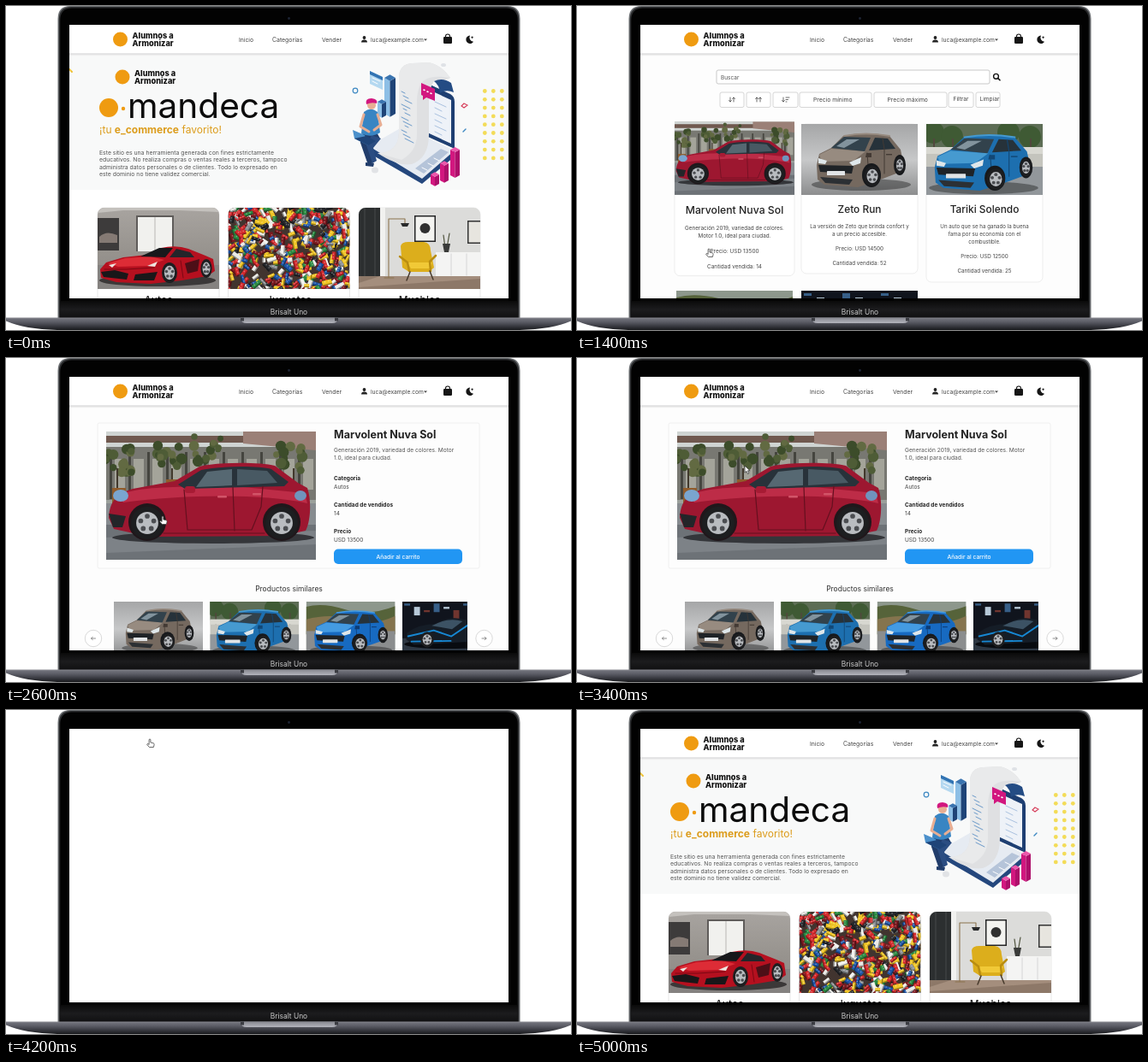
An HTML page that plays this animation: 660 by 379 pixels, repeating every 5.5 s.

```html
<!DOCTYPE html>
<html lang="es">
<head>
<meta charset="utf-8">
<title>Tienda</title>
<style>
html, body { margin: 0; width: 100%; height: 100%; overflow: hidden; background: #fff; }
#stage { display: block; width: 660px; height: 379px; }
text { font-family: Inter, "Open Sans", sans-serif; }
</style>
</head>
<body>
<svg id="stage" viewBox="0 0 660 379" xmlns="http://www.w3.org/2000/svg"></svg>
<script>
const LOOP = 5500, STEP = 100;
const BRAND = ['Alumnos a', 'Armonizar'];
const CARS = ['Marvolent Nuva Sol', 'Zeto Run', 'Tariki Solendo'];

// Drawing helpers
const rect = (x, y, w, h, fill, rx = 0, more = '') =>
  `<rect x="${x}" y="${y}" width="${w}" height="${h}" rx="${rx}" fill="${fill}" ${more}/>`;
const circ = (x, y, r, fill, more = '') => `<circle cx="${x}" cy="${y}" r="${r}" fill="${fill}" ${more}/>`;
const oval = (x, y, rx, ry, fill, more = '') =>
  `<ellipse cx="${x}" cy="${y}" rx="${rx}" ry="${ry}" fill="${fill}" ${more}/>`;
const path = (d, fill, more = '') => `<path d="${d}" fill="${fill}" ${more}/>`;
const line = (d, color, w = 1) => path(d, 'none', `stroke="${color}" stroke-width="${w}" stroke-linecap="round" stroke-linejoin="round"`);
const text = (x, y, size, s, fill = '#333', weight = 400, anchor = 'start') =>
  `<text x="${x}" y="${y}" font-size="${size}" fill="${fill}" font-weight="${weight}" text-anchor="${anchor}">${s}</text>`;
const mid = (x, y, size, s, fill, weight) => text(x, y, size, s, fill, weight, 'middle');
const box = (x, y, w, h, rx, color = '#ddd', fill = '#fff') => rect(x, y, w, h, fill, rx, `stroke="${color}" stroke-width=".8"`);
const photo = (x, y, w, h, vw, vh, art) =>
  `<svg x="${x}" y="${y}" width="${w}" height="${h}" viewBox="0 0 ${vw} ${vh}" preserveAspectRatio="xMinYMin slice">${art}</svg>`;
const group = (art, more = '') => `<g ${more}>${art}</g>`;
const grad = (id, ...stops) => `<linearGradient id="${id}" x2="0" y2="1">` +
  stops.map((c, i) => `<stop offset="${i / (stops.length - 1)}" stop-color="${c}"/>`).join('') + '</linearGradient>';

function random(seed) {
  return () => (seed = (seed * 16807) % 2147483647) / 2147483647;
}

function wheel(x, y, r, squash = 1) {
  let s = oval(x, y, r * squash, r, '#1d1e20') + oval(x, y, r * .68 * squash, r * .68, '#b9bcc0');
  for (let i = 0; i < 5; i++) {
    const a = i * 1.257 - 1.57;
    s += circ(x + Math.cos(a) * r * .42 * squash, y + Math.sin(a) * r * .42, r * .15, '#4b4d51');
  }
  return s;
}

// Photos as flat shapes
function street() {
  const rnd = random(41);
  let s = rect(0, 0, 245, 150, '#9ba19c') + rect(0, 0, 245, 26, '#cfd4d2') +
    rect(0, 18, 245, 62, '#787872') + rect(0, 5, 245, 8, '#70594f') + path('M160 0H245V22L160 14Z', '#9b8077');
  for (let x = 4; x < 245; x += 22) s += rect(x, 24, 3, 55, '#45453f') + rect(x + 6, 32, 12, 36, '#a4a49a');
  for (const [x, y] of [[14, 35], [75, 25], [118, 21], [214, 30]])
    for (let i = 0; i < 16; i++)
      s += circ(x + rnd() * 32 - 16, y + rnd() * 32 - 16, 3 + rnd() * 4, ['#3c4c2a', '#4e5c36', '#626a42'][i % 3]);
  for (const x of [12, 76, 117, 218]) s += rect(x, 43, 2, 30, '#41392d');
  s += rect(7, 66, 16, 25, '#8f5c2c') + rect(70, 56, 13, 20, '#8f5c2c') +
    rect(0, 84, 245, 66, '#878c90') + rect(0, 109, 245, 41, '#6d7277') + path('M0 124L245 116V132L0 142Z', '#7d8287') +
    oval(125, 124, 118, 7, '#34363a') +
    path('M3 101C4 83 11 73 31 67L80 58L109 41C125 36 178 35 197 40L224 60L235 66C240 80 239 105 233 116L205 122L50 123L9 114Z', '#9d1730') +
    path('M14 74C45 64 80 64 160 65L232 72L235 84C180 72 90 74 20 83Z', '#bd2c47') +
    path('M84 62L111 45C133 40 180 40 193 44L213 59L208 64L92 67Z', '#28323a') +
    path('M118 47L147 44V63L105 65Z', '#566872') + path('M153 44L188 46L200 60L153 63Z', '#485963') +
    line('M91 68L95 115H170L181 88L183 64M148 65L150 116M67 119H185', '#65101f', 1.2) +
    rect(92, 64, 12, 8, '#a71b34', 3) + rect(130, 75, 11, 2.5, '#d25468', 1) + rect(171, 72, 10, 2.5, '#d25468', 1) +
    oval(17, 75, 9, 7, '#7aa5cf') + oval(227, 75, 7, 6, '#7094bd') + path('M3 96L23 99L19 112L8 112Z', '#232529');
  return s + circ(48, 106, 22, '#20171b') + circ(205, 106, 22, '#20171b') + wheel(48, 107, 19) + wheel(205, 107, 19);
}

function hatch(paint, light, dark) {
  return oval(70, 71, 58, 7, '#000', 'opacity=".35"') +
    path('M18 48L21 35L35 28L49 14Q75 8 103 14L116 30L120 49L116 56L90 66L66 74L27 71L19 65Z', paint) +
    path('M21 36L35 29L75 32L61 43L24 44Z', light) +
    path('M35 28L50 15L81 16L74 32Z', '#32424c') + path('M41 26L53 18L68 18L50 28Z', '#82939d') +
    path('M79 31L86 16L101 17L110 29Z', '#26323a') + line('M95 17L97 30L97 58M77 34L78 48', dark, 1) +
    line('M50 14Q75 9 103 14', light, 2) +
    path('M20 48L61 49L59 58L22 56Z', '#1f2327') + path('M22 62L60 65L56 71L28 69Z', '#2c3034') +
    rect(30, 55, 21, 5, '#e1e4e6', .5) +
    path('M20 40L30 43L28 47L20 46Z', '#dfe7ea') + path('M56 45L70 39L69 46L60 49Z', '#dfe7ea') +
    path('M76 34l6 0v5l-7 0z', dark) + rect(99, 35, 7, 1.4, dark) +
    oval(82, 60, 11, 14, '#17191c') + oval(115, 48, 7, 12, '#17191c') + wheel(83, 61, 12, .8) + wheel(115, 48, 10, .6);
}

const studio = () => rect(0, 0, 136, 84, 'url(#studio)') + hatch('#75695f', '#978b80', '#433a34');
const plaza = () => rect(0, 0, 136, 84, '#c4c4bd') + rect(0, 0, 136, 28, '#5d6d55') +
  [8, 30, 96, 121].map((x, i) => circ(x, 10 + i % 2 * 5, 13, '#3f5a34') + rect(x, 17, 2, 18, '#51483d')).join('') +
  rect(0, 27, 136, 8, '#d8d8d1') + rect(0, 50, 136, 34, '#92979b') +
  group(hatch('#1d6faf', '#469ad0', '#124775'), 'transform="translate(-10 1) scale(1.1 1.04)"');
const road = () => rect(0, 0, 136, 84, '#8d978c') + path('M0 8Q25 1 60 12T136 7V50H0Z', '#56633a') +
  path('M0 27Q40 17 70 28T136 22V50H0Z', '#85744e') + rect(0, 45, 136, 39, '#8b8d8e') +
  group(hatch('#176ac1', '#449be2', '#0d3c75'), 'transform="translate(-7 3) scale(1.08 1)"');
function show() {
  let s = rect(0, 0, 136, 84, '#10141d');
  for (let i = 0; i < 9; i++) s += rect(3 + i * 15, 3 + i % 3 * 5, 9, 3 + i % 2 * 10, ['#375f88', '#b7c9d8', '#70352f'][i % 3]);
  return s + rect(0, 56, 136, 28, '#2d3743') + oval(68, 65, 65, 7, '#080b10') +
    path('M7 48Q25 34 52 34Q73 19 101 29L126 45L128 60L18 66L6 58Z', '#151d27') +
    path('M45 37Q70 23 92 30L76 42Z', '#3c5264') + line('M9 53L48 44L75 53L100 36L121 46M14 61L74 60', '#1688d4', 2.5) +
    wheel(38, 58, 12, .85) + wheel(110, 56, 12, .8);
}

function garage() {
  return rect(0, 0, 142, 96, 'url(#wall)') + path('M0 0H142V5L95 3H30L0 6Z', '#c4c1bd') +
    rect(45, 9, 44, 42, '#5f5c5a') + rect(47, 11, 40, 40, '#f1f1ee') + rect(66.5, 11, 1, 40, '#b9b8b4') +
    rect(0, 12, 25, 38, '#3d3b3b') + path('M2 34Q10 26 23 32V41H2Z', '#857a74') +
    rect(0, 67, 142, 29, '#858280') + oval(70, 85, 68, 7, '#3b3838') +
    path('M3 72L10 64L30 58L58 55L74 47Q92 43 106 48L126 56L135 60L137 74L128 80L98 85L62 89L22 87L4 82Z', '#b5101f') +
    path('M12 65L32 59L62 57L78 61L58 68L24 69Z', '#dd2c36') + path('M50 57L72 47L88 47L79 58Z', '#17181b') +
    path('M84 58L92 48L108 52L113 58Z', '#23252a') +
    path('M4 75L20 73L36 77L34 84L7 81Z', '#191719') + path('M44 78L70 75L66 85L42 85Z', '#191719') +
    path('M102 65L119 60L117 74L105 77Z', '#4d0f17') + line('M97 62L100 82M8 72L34 72L66 70', '#7c0713', 1) +
    path('M13 67l9-2l-5 5z', '#efe5df') + path('M58 68l12-5l-3 6z', '#efe5df') + wheel(84, 76, 12, .75) + wheel(127, 71, 11, .6);
}

function bricks() {
  const rnd = random(97);
  const tones = ['#d42a2d', '#f0c525', '#1e55a8', '#f1f1ed', '#e9e9e5', '#2b8a42', '#26282c', '#d42a2d', '#8a8f93', '#f0c525', '#7c1a20'];
  let s = rect(0, 0, 142, 96, '#41342f');
  for (let i = 0; i < 620; i++) {
    const x = rnd() * 150 - 4, y = rnd() * 104 - 4, w = 5 + rnd() * 7, h = 3.5 + rnd() * 2.5;
    const c = tones[Math.floor(rnd() * tones.length)];
    s += group(rect(0, 0, w, h, c) + rect(0, h - 1.3, w, 1.3, '#000', 0, 'opacity=".4"') +
      circ(w * .3, h * .3, .8, '#fff', 'opacity=".35"') + circ(w * .7, h * .3, .8, '#fff', 'opacity=".35"'),
      `transform="translate(${x.toFixed(1)} ${y.toFixed(1)}) rotate(${(rnd() * 180 - 90).toFixed(0)})"`);
  }
  return s;
}

function room() {
  return rect(0, 0, 142, 96, '#dcdcda') + rect(0, 0, 25, 88, '#2c2f30') + line('M7 0V86M19 0V86', '#474a4b', 1) +
    rect(25, 0, 6, 82, '#f1f1ef') + rect(0, 80, 142, 16, '#8d7868') + path('M0 88L25 80H142V83L0 93Z', '#a48e7d') +
    line('M35 82V13H54V18M30 82H41', '#8c744f', 1.1) + path('M49 18H59L57 22H51Z', '#292a2b') +
    rect(65, 9, 25, 31, '#242526') + rect(66.5, 10.5, 22, 28, '#f3f3f0') + circ(77.5, 24, 6, '#303030') +
    rect(90, 52, 52, 28, '#f4f4f3') + line('M108 54V79M126 54V79', '#cecece', .8) +
    rect(127, 15, 15, 27, '#333') + rect(128.5, 16.5, 14, 24, '#e7e5df') +
    line('M101 47L99 32M103 47L106 30', '#4e523c', 1.2) + path('M98 42H107L105 52H100Z', '#3a3b39') +
    path('M49 45Q50 40 58 40H76Q84 41 84 50L88 70L82 75H59L51 70Z', '#dcae1c') +
    path('M56 64H86L84 71H61Z', '#f1c937') + line('M48 57L57 64L59 74M90 56L83 63L84 74', '#b98d10', 2.5) +
    line('M60 75L56 85M83 74L87 84', '#473a2c', 1.5);
}

const brand = (x, y) => circ(x - 14, y, 8.5, '#ef9b11') +
  text(x, y - 1, 9.2, BRAND[0], '#111', 800) + text(x, y + 7.5, 9.2, BRAND[1], '#111', 800);

function nav() {
  return rect(74, 22, 513, 34, '#fff') + rect(74, 55.5, 513, 1.2, '#cdcdcf') + rect(74, 56.7, 513, 1.5, '#eee') +
    brand(147.5, 39) + text(272, 41.5, 6.8, 'Inicio', '#444') + text(311, 41.5, 6.9, 'Categorías', '#444') +
    text(369, 41.5, 6.8, 'Vender', '#444') + circ(418.5, 37, 1.9, '#222') + path('M415 42.5Q415 39.5 418.5 39.5T422 42.5Z', '#222') +
    text(426, 42, 6.7, 'luca@example.com', '#444') + path('M488 38.5h4l-2 2.2z', '#444') +
    rect(511, 36, 10, 8, '#161616', 1.2) + line('M513.5 37V35.5a2.5 2.5 0 0 1 5 0V37', '#161616', 1.1) +
    path('M542 34.5A4.7 4.7 0 1 0 546 41.8A5 5 0 0 1 542 34.5Z', '#161616') + path('M544.5 35l.6 1.2l1.2.5l-1.2.5l-.6 1.2l-.5-1.2l-1.2-.5l1.2-.5z', '#161616');
}

function bar(x, y, w, h, front, side, top) {
  const m = x + w / 2, e = x + w, d = w * .28;
  return path(`M${x} ${y}L${m} ${y + d}V${y + h + d}L${x} ${y + h}Z`, front) +
    path(`M${m} ${y + d}L${e} ${y}V${y + h}L${m} ${y + h + d}Z`, side) +
    path(`M${x} ${y}L${m} ${y - d}L${e} ${y}L${m} ${y + d}Z`, top);
}

function scene() {
  const pink = ['#d2177f', '#ad0f6a', '#ec58ab'], blue = ['#8dbfe6', '#1f4477', '#3a74b0'];
  let s = oval(431, 192, 4, 3.5, '#e1e3e6') + circ(408, 99, 2.8, 'none', 'stroke="#3d88c2" stroke-width="1.2"') +
    oval(511, 69, 3, 2, '#dfe2e6') + bar(442, 84, 13, 42, ...blue) + bar(434, 112, 10, 16, ...blue);
  // Laptop
  s += path('M424 165L464 142L524 170V176L486 208L424 172Z', '#24477d') + path('M424 164L464 141L524 169L486 202Z', '#e6ebf2') +
    path('M478 190L508 167L517 171L488 196Z', '#b5c4d9') + line('M486 189l6 3M493 184l6 3M500 178l6 3', '#fff', 1) +
    path('M462 84Q462 77 467 79L519 103Q524 106 524 112V167L462 139Z', '#1e3f72') + path('M466 85L520 110V161L466 136Z', '#eef2f8');
  for (let i = 0; i < 6; i++) s += line(`M501 ${112 + i * 7}l${i % 2 ? 8 : 13} ${i % 2 ? 4 : 6}`, '#a9c1df', 1);
  // Paper ribbon
  s += path('M459 84Q459 68 474 67L494 66Q510 70 519 84Q515 87 500 88Q494 96 494 110V150Q494 178 474 185Q458 188 434 172Q458 172 459 148Z', '#dfe0e2') +
    path('M459 84Q459 68 474 67L494 66Q510 70 519 84Q496 80 487 88Q480 96 480 112V150Q480 170 462 180L434 172Q458 172 459 148Z', '#e9eaeb') +
    path('M500 88Q510 83 520 90L523 101Q514 97 507 102Q506 92 500 88Z', '#244c84');
  for (let i = 0; i < 12; i++) s += line(`M${462 + i % 3 * 2} ${100 + i * 5}l${4 + i % 4 * 2} ${2 + i % 4}`, '#5b8fc4', .9);
  s += path('M485 90L501 97V111L491 107L487 110V105L485 104Z', pink[0]) + line('M488 98l1 .5M492 100l1 .5M496 102l1 .5', '#fff', 1.6);
  s += path('M425 76L440 83V98L425 91Z', '#b4d8f0') + path('M425 76L440 83V87L425 80Z', '#3274b3') +
    line('M428 84l9 4M428 88l6 3', '#fff', 1);
  // Seated figure
  s += path('M414 150L432 146L437 155L424 162L429 183L423 186L414 160Z', '#213d6b') +
    path('M427 151L438 155L429 166L433 181L428 184L421 163Z', '#2b4d82') +
    path('M418 124Q426 117 434 124L437 148Q426 155 415 149Z', '#3985c3') +
    line('M418 127L414 141L424 147M434 127L438 139L430 145', '#e8ae93', 3) +
    circ(427, 116, 5, '#e8ae93') + path('M421 115Q419 108 427 108Q435 109 433 114Q427 112 421 115Z', '#d2177f') +
    path('M405 145L419 151L423 163L407 155Z', '#4b90cb') + path('M407 155L423 163L432 158L421 152Z', '#1f4478') +
    path('M420 183l10 1l-1 4l-9-1z', '#213d6b');
  s += bar(496, 197, 10, 11, ...pink) + bar(507, 184, 10, 20, ...pink) + bar(519, 168, 11, 30, ...pink);
  s += path('M535 114l4 2l-4 3l-3-2z', 'none', 'stroke="#d63b58" stroke-width="1.1"') + line('M534 147l3-3', '#3d88c2', 1.4);
  for (let y = 0; y < 9; y++) for (let x = 0; x < 3; x++) s += circ(559.3 + x * 10, 99.5 + y * 9.8, 2.4, '#f3dc58');
  return s;
}

function home() {
  let s = rect(74, 22, 513, 321, '#fff') + rect(74, 57, 513, 158, '#f8f9f9') + nav() + line('M74 74l3 3', '#f0c43c', 2) +
    brand(150, 83) + circ(120, 119, 11, '#ef9b11') + circ(137, 120, 2.2, '#ef9b11') +
    text(142, 131, 40.6, 'mandeca', '#0b0b0b') +
    text(109, 149, 12, '¡tu <tspan font-weight="700">e_commerce</tspan> favorito!', '#dc9c1b');
  ['Este sitio es una herramienta generada con fines estrictamente',
   'educativos. No realiza compras o ventas reales a terceros, tampoco',
   'administra datos personales o de clientes. Todo lo expresado en',
   'este dominio no tiene validez comercial.'].forEach((t, i) => s += text(109, 173.5 + i * 8.5, 6.85, t, '#555'));
  s += scene();
  const cards = [[107, garage, 'Autos'], [259.5, bricks, 'Juguetes'], [412, room, 'Muebles']];
  for (const [x, , name] of cards) s += box(x, 236, 142, 130, 8, '#e2e2e2') + mid(x + 71, 348.3, 11.9, name, '#222', 500);
  return s + group(cards.map(([x, art]) => photo(x, 236, 142, 95, 142, 95, art())).join(''), 'clip-path="url(#cards)"');
}

function card(x, art, name, lines, price, sold, bottom, dy = 0) {
  const c = x + 68, end = 259.5 + dy + lines.length * 9;
  return box(x, 138, 136, bottom - 138, 6, '#e9e9e9') + art + mid(c, 242 + dy * .3, 11.9, name, '#222', 500) +
    lines.map((t, i) => mid(c, 259.5 + dy + i * 9, 6.2, t, '#444')).join('') +
    mid(c, end + 8.5, 6.3, 'Precio: USD ' + price, '#444') + mid(c, end + 25.5, 6.3, 'Cantidad vendida: ' + sold, '#444');
}

function list() {
  let s = rect(74, 22, 513, 321, '#fdfdfd') + nav() + box(163, 75, 319, 16, 2, '#bbb') + text(168, 85.5, 6.5, 'Buscar', '#555') +
    circ(489.5, 82.3, 2.9, 'none', 'stroke="#111" stroke-width="1.4"') + line('M491.8 84.6l2.2 2.2', '#111', 1.6);
  for (const [x, w] of [[167, 28], [198, 28], [229, 29], [260, 84], [347, 85], [434, 29], [466, 28]]) s += box(x, 101, w, 17.5, 2, '#ccc');
  s += line('M179 107v5m-1.4-1.5l1.4 1.5l1.4-1.5M183 112v-5m-1.4 1.5l1.4-1.5l1.4 1.5', '#444', .8) +
    line('M210 112v-5m-1.4 1.5l1.4-1.5l1.4 1.5M214 112v-5m-1.4 1.5l1.4-1.5l1.4 1.5', '#444', .8) +
    line('M241 107v5m-1.4-1.5l1.4 1.5l1.4-1.5M244 107h4M244 109.5h2.5M244 112h1', '#444', .8) +
    text(276, 112, 6.8, 'Precio mínimo', '#444') + text(362.5, 112, 6.8, 'Precio máximo', '#444') +
    text(439.5, 111, 6.6, 'Filtrar', '#444') + text(470.5, 111, 6.6, 'Limpiar', '#444');
  s += card(262, photo(262, 138, 136, 83, 136, 83, studio()), CARS[1],
      ['La versión de Zeto que brinda confort y', 'a un precio accesible.'], 14500, 52, 313) +
    card(408, photo(408, 138, 136, 83, 136, 83, plaza()), CARS[2],
      ['Un auto que se ha ganado la buena', 'fama por su economía con el', 'combustible.'], 12500, 25, 323) +
    photo(116, 333, 136, 83, 136, 83, road()) + photo(262, 333, 136, 83, 136, 83, show());
  return s + group(card(116, photo(116, 138, 136, 83, 245, 149.5, street()), CARS[0],
      ['Generación 2019, variedad de colores.', 'Motor 1.0, ideal para ciudad.'], 13500, 14, 313, 1.5),
    'transform="translate(184 226) scale(1.03) translate(-184 -226)"');
}

function detail() {
  let s = rect(74, 22, 513, 321, '#fdfdfd') + nav() + box(107, 76, 446, 170, 2, '#ececec', '#fdfdfd') +
    photo(117, 86, 245, 150, 245, 150, street()) + text(383, 94, 12.5, CARS[0], '#222', 700) +
    text(383, 109.5, 6.6, 'Generación 2019, variedad de colores. Motor', '#555') + text(383, 118.5, 6.6, '1.0, ideal para ciudad.', '#555');
  [['Categoría', 'Autos'], ['Cantidad de vendidos', '14'], ['Precio', 'USD 13500']].forEach(([k, v], i) =>
    s += text(383, 143 + i * 31.2, 6.5, k, '#222', 700) + text(383, 152.5 + i * 31.2, 6.5, v, '#444'));
  s += rect(383, 223.5, 150, 17.5, '#2196f3', 5) + mid(458, 234.7, 6.7, 'Añadir al carrito', '#fff', 500) +
    mid(330.5, 272.5, 8.5, 'Productos similares', '#333');
  [studio, plaza, road, show].forEach((art, i) => {
    const w = i < 3 ? 104 : 76;
    s += photo(126 + i * 112.3, 285, w, 63.5, w / .765, 83, art());
  });
  for (const [x, d] of [[102, -1], [558.5, 1]])
    s += circ(x, 328, 9.7, '#fff', 'stroke="#d0d0d0" stroke-width=".8"') +
      line(`M${x - 2.5 * d} 328h${5 * d}m${-1.8 * d} -1.6l${1.8 * d} 1.6l${-1.8 * d} 1.6`, '#777', .8);
  return s;
}

function laptop() {
  return path('M60.5 366V15Q60.5 0 75 0H586Q600.5 0 600.5 15V366Z', '#6d7073') +
    path('M61.8 366V16Q61.8 1 76 1H585Q599.2 1 599.2 16V366Z', '#2a2b2d') +
    path('M63.3 366V17Q63.3 2.5 77 2.5H584Q597.7 2.5 597.7 17V366Z', '#020202') +
    rect(63.3, 345, 534.4, 20, 'url(#chin)') + circ(330.5, 14.5, 1.4, '#1d2434') + rect(74, 22, 513, 320, '#fff') +
    mid(330.5, 361.3, 8.4, 'Brisalt Uno', '#c9c9c9') +
    path('M0 365H660V368.5Q638 378 600 379H60Q22 378 0 368.5Z', 'url(#base)') + rect(0, 364.5, 660, 1, '#85868e') +
    path('M274 364.5H388V366Q387 371 381 371H281Q275 371 274 366Z', 'url(#notch)') +
    rect(274, 364.5, 4, 4, '#3b3c42') + rect(384, 364.5, 4, 4, '#3b3c42');
}

const arrow = path('M0 0V8.2L2 6.4L3.4 9.5L4.9 8.8L3.5 5.8H6.1Z', '#fff', 'stroke="#333" stroke-width=".8"');
const hand = path('M-.9 1Q-.9 0 0 0T.9 1V4L4.2 4.8Q5.4 5.2 5.1 6.6L4.4 9.5H-.6L-3.3 6.4Q-3.1 5.2-2 5.6L-.9 6.5Z', '#fff', 'stroke="#444" stroke-width=".8" stroke-linejoin="round"');
const pages = { home, list, detail };

document.getElementById('stage').innerHTML = '<defs>' +
  grad('studio', '#a5a6a7', '#c7c8c9', '#8b8c8d') + grad('wall', '#a8a4a0', '#98948f', '#8a8682') +
  grad('chin', '#0a0a0a', '#1c1c1e', '#101011') +
  grad('base', '#74757e', '#5b5c65', '#393a41', '#18191c') + grad('notch', '#85868e', '#b3b4bc') +
  '<clipPath id="screen"><rect x="74" y="22" width="513" height="320"/></clipPath><clipPath id="cards">' +
  [107, 259.5, 412].map(x => rect(x, 236, 142, 120, '#000', 8)).join('') + '</clipPath></defs>' + laptop() +
  group(Object.entries(pages).map(([id, draw]) => group(draw(), `id="${id}"`)).join('') +
    group(group(arrow, 'id="arrow"') + group(hand, 'id="hand"'), 'id="cursor"'), 'clip-path="url(#screen)"');

const $ = id => document.getElementById(id);
const toggle = (id, on) => $(id).setAttribute('display', on ? 'inline' : 'none');

// Page changes: [start, page]
const cuts = [[0, 'home'], [1300, ''], [1400, 'list'], [2400, ''], [2500, 'detail'], [4200, ''], [4300, 'home']];
// Pointer stops: [time, x, y]
const stops = [[400, 480, 65], [600, 339, 157], [900, 154, 284], [1800, 154, 284], [2100, 183, 185], [3000, 183, 185],
  [3400, 196, 126], [3800, 168, 34], [4300, 168, 34], [4700, 420, 100]];

function pointer(t) {
  const i = Math.max(1, stops.findIndex(s => s[0] >= t));
  const [a, b] = [stops[i - 1], stops[i]];
  const k = (t - a[0]) / (b[0] - a[0]);
  return [a[1] + (b[1] - a[1]) * k, a[2] + (b[2] - a[2]) * k];
}

function render(ms) {
  const t = Math.floor(ms % LOOP / STEP) * STEP;
  const page = cuts.filter(c => c[0] <= t).pop()[1];
  for (const id in pages) toggle(id, id === page);
  const on = t >= 400 && t < 4700;
  toggle('cursor', on);
  if (!on) return;
  const [x, y] = pointer(t);
  const link = t >= 800 && t < 3200 || t >= 3800 && t < 4400;
  toggle('hand', link);
  toggle('arrow', !link);
  $('cursor').setAttribute('transform', `translate(${x} ${y})`);
}

const start = performance.now();
function tick() {
  render(performance.now() - start);
  requestAnimationFrame(tick);
}
tick();
</script>
</body>
</html>
```
